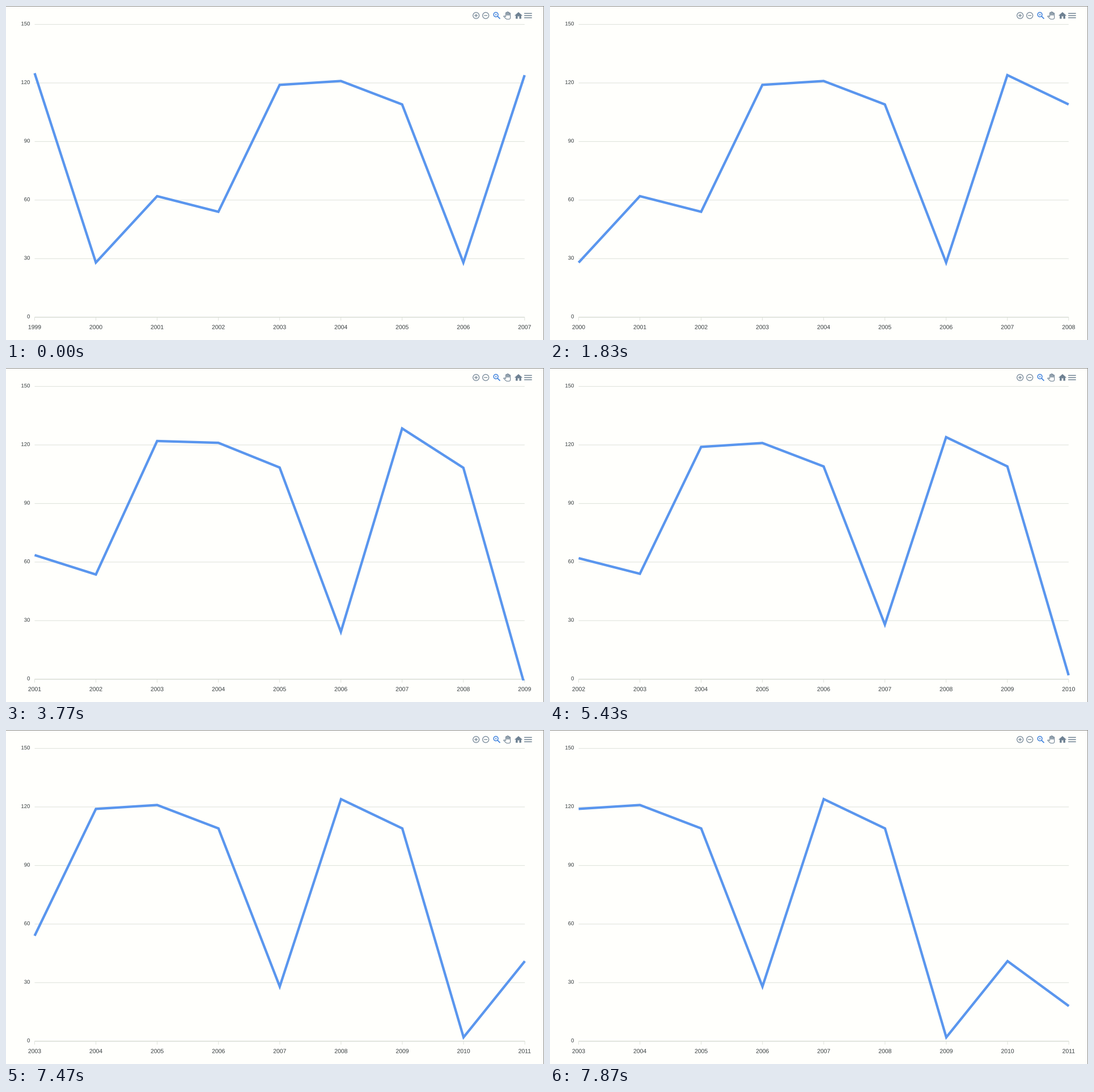
These frames come from a looping animation (949 by 590 pixels, 8000 ms). A matplotlib script:

```python
import numpy as np
import matplotlib.pyplot as plt
from matplotlib.animation import FuncAnimation
from matplotlib.patches import Circle, PathPatch, Polygon, Rectangle
from matplotlib.path import Path
from matplotlib.textpath import TextPath

W, H, DPI = 949, 590, 128
PX = 72 / DPI                      # points per pixel
LOOP, STEP = 8000, 20              # ms
PAPER, BLUE, INK = "#fffffc", "#5a96ee", "#373d3f"
GRID, AXIS, FRAME = "#dee2db", "#d6dad2", "#8e8e8b"
ICON, ACTIVE = "#6e8192", "#3f82de"

LEFT, ZERO, UNIT = 50.5, 549.7, 3.448
VALUES = np.array([125, 28, 62, 54, 119, 121, 109, 28, 124, 109, 2, 41, 18])
SPAN, FIRST_YEAR = 9, 1999
DIGIT = 0.556                      # digit advance, in ems

SWAPS = (1400, 3430, 5430, 7470)   # the labels move on, then the line follows
DELAY, MORPH, HOLD = 50, 350, 66   # ms

plt.rcParams["font.family"] = "Liberation Sans"
plt.rcParams["path.snap"] = False
plt.rcParams["path.simplify"] = False

fig = plt.figure(figsize=(W / DPI, H / DPI), dpi=DPI, facecolor=PAPER)
ax = fig.add_axes([0, 0, 1, 1])
ax.set_xlim(0, W)
ax.set_ylim(H, 0)
ax.axis("off")


def stroke(xs, ys, color, width=1.0, **kw):
    return ax.plot(xs, ys, color=color, lw=width * PX, solid_capstyle="butt",
                   solid_joinstyle="miter", **kw)[0]


def bar(x, y, w, h, color):
    ax.add_patch(Rectangle((x, y), w, h, fc=color, ec="none"))


def ring(x, y, r, color, width):
    ax.add_patch(Circle((x, y), r, fc="none", ec=color, lw=width * PX))


def dash(x, y, arm, color, width):
    stroke([x - arm, x + arm], [y, y], color, width)


def plus(x, y, arm, color, width):
    dash(x, y, arm, color, width)
    stroke([x, x], [y - arm, y + arm], color, width)


def number_path(value, x, y, size, align):
    """Outline of a number; align is 0.5 for centred, 1 for right-aligned."""
    text = str(value)
    path = TextPath((0, 0), text, size=size)
    origin = (x - align * DIGIT * size * len(text), y)
    return Path(path.vertices * (1, -1) + origin, path.codes)


def label(path):
    return ax.add_patch(PathPatch(path, fc=INK, ec="none"))


def draw_magnifier(x, y):
    ring(x, y, 3.95, ACTIVE, 1.45)
    plus(x, y, 1.8, ACTIVE, 0.75)
    stroke([x + 3, x + 7.4], [y + 3, y + 7.4], ACTIVE, 1.7)


def draw_hand(x, y, scale):
    outline = [(8, 15.9)]
    for left, top in zip((8, 12, 16, 20), (2.5, 0, 1, 4)):
        outline += [(left, 11), (left, top + 1), (left + 1, top),
                    (left + 2, top), (left + 3, top + 1), (left + 3, 11)]
    outline += [(23, 20), (21.8, 22.8), (19, 24), (11.7, 24), (8.9, 22.8),
                (1, 14.8), (2.3, 13.6), (3.7, 13.4)]
    ax.add_patch(Polygon(np.array(outline) * scale + (x, y), fc=PAPER, ec=ICON,
                         lw=2 * scale * PX, joinstyle="miter"))


def draw_house(x, y, scale):
    roof = np.array([(-10, 0), (0, -9), (10, 0)])
    ax.add_patch(Polygon(roof * scale + (x, y), fc=ICON, ec="none"))
    for left, width, height in ((-7, 5, 8), (-2.1, 4.2, 2), (2, 5, 8)):
        bar(x + left * scale, y - 0.1, width * scale, height * scale, ICON)


def draw_toolbar(y=16.8):
    for x, sign in ((829.2, plus), (846.2, dash)):
        ring(x, y, 5.45, ICON, 1.2)
        sign(x, y, 3, ICON, 1.2)
    draw_magnifier(864.1, y - 1.6)
    draw_hand(877.2, y - 6.5, 0.54)
    draw_house(904, y + 0.2, 0.7)
    for row in (-1, 0, 1):
        dash(920.9, y + 0.1 + 3.8 * row, 6.8, ICON, 1.5)


grid_lines = []
for value in range(0, 151, 30):
    y = ZERO - value * UNIT
    color, width = (GRID, 1) if value else (AXIS, 1.4)
    grid_lines.append(stroke([LEFT, LEFT], [y, y], color, width))
    label(number_path(value, 42.4, y + 1.9, 9.55, 1))

ticks = [stroke([0, 0], [ZERO, ZERO + 6], GRID) for _ in range(SPAN)]
years = [label(number_path(0, 0, 0, 1, 0)) for _ in range(SPAN)]
series = stroke([], [], BLUE, 4.33, zorder=3)
series.set_clip_path(Rectangle((LEFT - 2.2, 30), 869, 522,
                               transform=ax.transData))

draw_toolbar()
bar(0, 0, W, 1, FRAME)
bar(W - 1, 0, 1, H, FRAME)


def back_out(p):
    q = np.clip(p, 0, 1) - 1
    return q * q * (2.70158 * q + 1.70158) + 1


def window(k):
    return VALUES[k:k + SPAN]


def chart_state(t):
    """Number of label swaps so far and the plotted values at time t."""
    shift = sum(t >= swap for swap in SWAPS)
    if shift == 0:
        return 0, window(0)
    elapsed = (t - SWAPS[shift - 1]) // HOLD * HOLD
    mix = back_out((elapsed - DELAY) / MORPH)
    before, after = window(shift - 1), window(shift)
    return shift, before + (after - before) * mix


def update(i):
    shift, values = chart_state(i * STEP + STEP / 2)
    last_year = FIRST_YEAR + shift + SPAN - 1
    # a kerned "11" is narrower and leaves the plot a little more room
    width = 864.7 if last_year == 2011 else 864.3
    xs = LEFT + np.linspace(0, width, SPAN)
    series.set_data(xs, ZERO - UNIT * values)
    for line in grid_lines:
        line.set_xdata([LEFT, xs[-1]])
    for n, (x, tick, year) in enumerate(zip(xs, ticks, years)):
        tick.set_xdata([x, x])
        year.set_path(number_path(FIRST_YEAR + shift + n, x, 570.7, 10.4, 0.5))
    return [series, *grid_lines, *ticks, *years]


anim = FuncAnimation(fig, update, frames=LOOP // STEP, interval=STEP,
                     repeat=True, repeat_delay=0)
plt.show()
```
